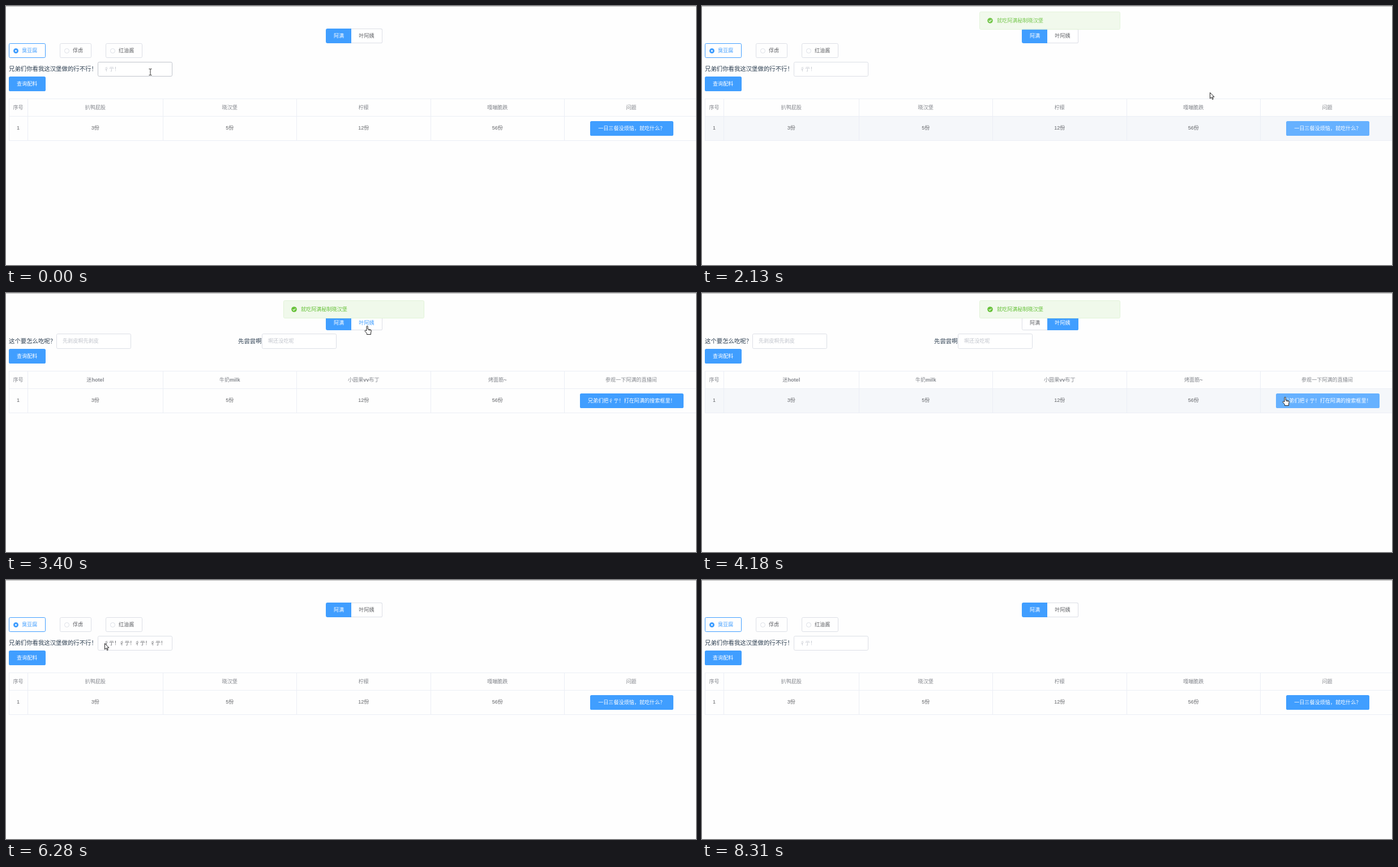
An HTML page that plays this animation: 1219 px wide and 459 px high, repeating every 9.01 s.

```html
<!DOCTYPE html>
<html lang="zh-CN">
<head>
<meta charset="utf-8">
<title>配料查询</title>
<style>
html, body { margin: 0; width: 100%; height: 100%; overflow: hidden; background: #fefefe; }
#stage {
  position: relative; width: 1219px; height: 459px; overflow: hidden; color: #606266;
  font: 9.1px "Liberation Sans", "Noto Sans CJK SC", "Noto Sans CJK", sans-serif;
}
#stage div { position: absolute; box-sizing: border-box; white-space: nowrap; }
#stage .topline { left: 0; top: 0; width: 1219px; height: 1px; background: #b4b4b4; }
.label { color: #2c3e50; font-size: 10.4px; line-height: 26px; }
.input { width: 132px; height: 26.5px; padding-left: 10px; line-height: 25px; border: 1px solid #dcdfe6; border-radius: 2.6px; background: #fff; }
.input.hover { border-color: #c0c4cc; }
.hint { color: #c0c4cc; }
.btn { height: 26px; line-height: 26px; text-align: center; color: #fff; background: #409eff; border-radius: 2.6px; }
.btn.hover { background: #66b1ff; }
.radio { height: 26px; line-height: 24px; padding-left: 22px; border: 1px solid #dcdfe6; border-radius: 2.6px; }
.radio i { position: absolute; box-sizing: border-box; left: 6.5px; top: 7.5px; width: 9.2px; height: 9.2px; border: 1px solid #dcdfe6; border-radius: 50%; background: #fff; }
.radio.on { color: #409eff; border-color: #409eff; }
.radio.on i { border: 3.2px solid #409eff; }
.cell { text-align: center; border: solid #ebeef5; border-width: 0 1px 1px 0; }
.head { height: 32px; line-height: 31px; color: #84878d; border-top-width: 1px; }
.row { height: 43px; line-height: 41px; }
.hoverRow .row { background: #f5f7fa; }
.tab {
  top: 40px; height: 26px; line-height: 24px; text-align: center; border: 1px solid;
  background: color-mix(in srgb, #409eff calc(var(--on) * 100%), #fff);
  border-color: color-mix(in srgb, #409eff calc(var(--on) * 100%), #dcdfe6);
  color: color-mix(in srgb, #fff calc(var(--on) * 100%), var(--ink, #606266));
}
#tabA { left: 565px; width: 46px; border-radius: 2.6px 0 0 2.6px; }
#tabB { left: 610px; width: 55px; border-radius: 0 2.6px 2.6px 0; border-left-width: 0; }
#message { left: 490px; top: 13px; width: 249px; height: 32px; padding-left: 30px; line-height: 31px; color: #67c23a; background: #f0f9eb; border: 1px solid #e1f3d8; border-radius: 2.6px; }
#message svg { position: absolute; left: 13px; top: 10px; }
#cursor { left: 0; top: 0; }
#cursor svg { position: absolute; left: 0; top: 0; overflow: visible; }
</style>
</head>
<body>
<div id="stage">
  <div id="panelA"></div>
  <div id="panelB"></div>
  <div id="tabA" class="tab">阿满</div>
  <div id="tabB" class="tab">叶阿姨</div>
  <div id="message">
    <svg width="10" height="10" viewBox="0 0 10 10"><circle cx="5" cy="5" r="4.8" fill="#67c23a"/><path d="M2.7 5.1 4.4 6.8 7.4 3.6" fill="none" stroke="#fff" stroke-width="1.1"/></svg>
    就吃阿满秘制晓汉堡
  </div>
  <div class="topline"></div>
  <div id="cursor">
    <svg id="arrow" width="10" height="14"><path d="M.5 .5V11L3 8.7 4.7 12.6 6.3 11.9 4.6 8.1H8Z" fill="#fff" stroke="#222"/></svg>
    <svg id="hand" width="12" height="17"><path d="M-1 9V1.2Q0 -.4 1.2 1.2V6L6 7Q7.5 7.4 7.3 9L6.5 13V15.5H-.5V13.5L-4 9.5Q-4 7.6-2.5 8.2Z" fill="#fff" stroke="#222"/><path d="M3 6.5V8.5M5 7V8.8" stroke="#222"/></svg>
    <svg id="beam" width="8" height="12"><path d="M-2.5 -5.5H-.8L0 -5 .8 -5.5H2.5M0 -5V5M-2.5 5.5H-.8L0 5 .8 5.5H2.5" fill="none" stroke="#333"/></svg>
  </div>
</div>
<script>
const $ = id => document.getElementById(id);
const box = (cls, x, y, w, html, id = '') =>
  `<div class="${cls}" ${id && `id="${id}"`} style="left:${x}px;top:${y}px;${w ? `width:${w}px` : ''}">${html}</div>`;

const edges = [5, 39, 277.5, 514, 750.5, 987, 1223];
const counts = ['1', '3份', '5份', '12份', '56份', ''];
const boldLatin = text => text.replace(/[a-z~]+/g, '<b>$&</b>');

function table(top, heads, action, width, id) {
  const line = (cls, y, items) => items.map((text, i) =>
    box('cell ' + cls, edges[i], y, edges[i + 1] - edges[i], text)).join('');
  return line('head', top, heads.map(boldLatin)) + line('row', top + 32, counts) +
    box('', 5, top, 1, '<div style="width:1px;height:75px;background:#ebeef5"></div>') +
    box('btn', 1105.3 - width / 2, top + 40, width, action, id);
}

const radios = [['臭豆腐', 5, 64.5], ['俘虏', 95, 55.5], ['红油酱', 176, 64.5]];
$('panelA').innerHTML =
  radios.map(([text, x, w], i) => box('radio', x, 66, w, `<i></i>${text}`, 'radio' + i)).join('') +
  box('label', 5, 99, 0, '兄弟们你看我这汉堡做的行不行！') +
  box('input', 162, 98.5, 132, '', 'word') +
  box('btn', 5, 125, 64.5, '查询配料') +
  table(164, ['序号', '扒鸭屁股', '晓汉堡', '柠檬', '嘎嘣脆跌', '问题'], '一日三餐没烦恼，就吃什么？', 146.5, 'askA');
$('panelB').innerHTML =
  box('label', 5, 73, 0, '这个要怎么吃呢？') +
  box('input hint', 89, 72.3, 132, '先剥皮啊先剥皮') +
  box('label', 410, 73, 0, '先尝尝啊') +
  box('input hint', 452, 72.3, 132, '啊还没吃呢') +
  box('btn', 5, 98.7, 64.5, '查询配料') +
  table(138, ['序号', '迷hotel', '牛奶milk', '小圆果vv布丁', '烤面筋~', '参观一下阿满的直播间'],
    '兄弟们把彳亍！打在阿满的搜索框里！', 183, 'askB');

// [step, x, y] of the pointer tip
const path = [
  [0, 255, 116.5], [1, 268, 118], [2, 300, 126], [5, 520, 165], [8, 769, 201], [10, 930, 207],
  [12, 1021, 206], [13, 1060, 213], [14, 1060, 213], [15, 1010, 190], [16, 897, 153],
  [18, 740, 95], [21, 640, 58], [25, 638, 58], [27, 640, 60], [29, 800, 115], [31, 1030, 184],
  [32, 1049, 189], [35, 1049, 189], [37, 860, 185], [40, 360, 163], [43, 240, 132], [46, 174, 112],
  [48, 124, 88], [49, 121, 82], [50, 121, 82], [52, 206, 82], [54, 45, 82], [56, 216, 96], [60, 1120, 446], [61, 1130, 480]
];
const messageLevel = { 15: .5, 16: .9, 36: .85, 37: .25 };
const tabLevel = { 26: .6, 35: .4 };
const clock = [[0, 0], [120, 1], [1190, 9], [2260, 17], [3400, 25], [4480, 33], [5610, 41], [6700, 49], [7800, 57], [8310, 61], [9010, 61]];
const LOOP = 9010;

function lerp(points, at, col = 1) {
  const i = Math.max(1, points.findIndex(p => p[0] >= at));
  const a = points[i - 1], b = points[i];
  return a[col] + (b[col] - a[col]) * (at - a[0]) / (b[0] - a[0]);
}
const within = (n, ...spans) => spans.some(([from, to]) => n >= from && n <= to);
const show = (id, on) => { $(id).style.display = on ? '' : 'none'; };

function pose(n) {
  const second = within(n, [25, 33]);
  show('panelA', !second);
  show('panelB', second);
  $('panelA').classList.toggle('hoverRow', within(n, [13, 17]));
  $('panelB').classList.toggle('hoverRow', within(n, [31, 33]));
  $('askA').classList.toggle('hover', within(n, [13, 23]));
  $('askB').classList.toggle('hover', within(n, [31, 33]));

  const filled = within(n, [34, 49]);
  $('word').textContent = filled ? '彳亍！'.repeat(4) : '彳亍！';
  $('word').classList.toggle('hint', !filled);
  $('word').classList.toggle('hover', n <= 1);
  const chosen = within(n, [50, 51]) ? 1 : within(n, [52, 53]) ? 2 : 0;
  radios.forEach((_, i) => $('radio' + i).classList.toggle('on', i === chosen));

  const tab = tabLevel[n] ?? +within(n, [27, 34]);
  $('tabA').style.setProperty('--on', 1 - tab);
  $('tabB').style.setProperty('--on', tab);
  $('tabB').style.setProperty('--ink', within(n, [21, 26]) ? '#409eff' : '#606266');

  const level = messageLevel[n] ?? +within(n, [17, 35]);
  $('message').style.opacity = level;
  $('message').style.transform = `translateY(${(level - 1) * 31}px)`;

  const beam = n <= 1, hand = within(n, [13, 14], [21, 27], [31, 33], [49, 54]);
  show('beam', beam);
  show('hand', hand);
  show('arrow', !beam && !hand);
  show('cursor', n < 61);
  $('cursor').style.transform = `translate(${Math.round(lerp(path, n))}px,${Math.round(lerp(path, n, 2))}px)`;
}

let last = -1;
function tick() {
  const step = Math.floor(lerp(clock, performance.now() % LOOP) + .25);
  if (step !== last) pose(last = step);
  requestAnimationFrame(tick);
}
tick();
</script>
</body>
</html>
```
